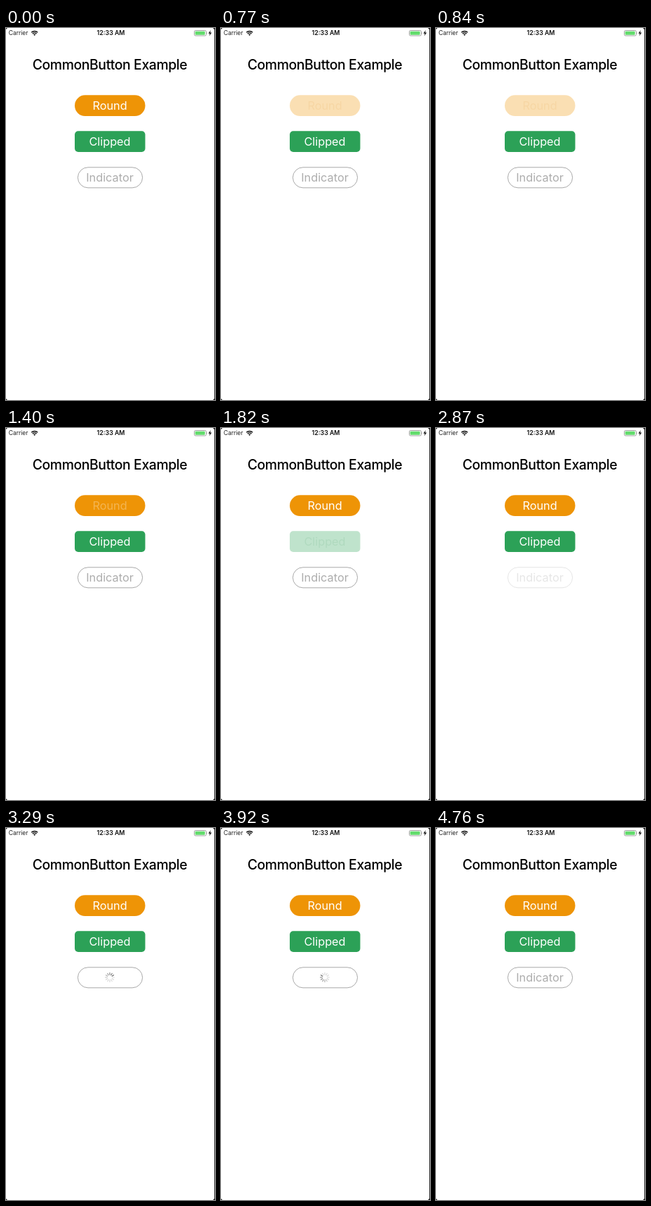
Recreate the animation shown at these times as an HTML page. Size 298 by 528 pixels, loop 5.04 s.

```html
<!DOCTYPE html>
<html lang="en">
<head>
<meta charset="utf-8">
<title>Button states</title>
<style>
  html, body { margin: 0; width: 100%; height: 100%; overflow: hidden; background: #fff; }
  svg { display: block; width: 298px; height: 528px; }
  text { font-family: Inter, sans-serif; font-optical-sizing: none; text-anchor: middle; }
  .label { font-size: 16.3px; }
</style>
</head>
<body>
<svg viewBox="0 0 298 528">
  <text x="17.6" y="10.4" font-size="8.5" fill="#222">Carrier</text>
  <g fill="none" stroke="#111" stroke-width="1.5">
    <path d="M36.2 6.3a6.4 6.4 0 0 1 9 0M37.9 8.1a4 4 0 0 1 5.6 0"/>
    <path d="M40.7 10.9l-1.5-1.6a2.2 2.2 0 0 1 3 0z" fill="#111" stroke="none"/>
  </g>
  <text x="149.5" y="10.4" font-size="8.8" font-weight="600" fill="#111">12:33 AM</text>
  <rect x="268.5" y="3.5" width="17" height="7.5" rx="1.8" fill="none" stroke="#8b8b8b" stroke-width=".8"/>
  <rect x="269.7" y="4.7" width="14" height="5.1" rx=".8" fill="#62dc6c"/>
  <path d="M286.4 5.8q1.2 1.4 0 2.8z" fill="#8b8b8b"/>
  <path d="M291.8 3l-3.2 4.7h2.1l-.8 3.6 3.4-4.9h-2.2z" fill="#111"/>

  <text x="148" y="59.2" font-size="19.4" font-weight="500" letter-spacing="-.4">CommonButton Example</text>

  <rect id="round" x="98" y="95.3" width="100.5" height="29.7" rx="14.8" fill="#ee9406"/>
  <text id="roundText" class="label" x="148" y="116.4">Round</text>
  <rect id="clipped" x="98" y="146.3" width="100.5" height="29.7" rx="5" fill="#2ca157"/>
  <text id="clippedText" class="label" x="148" y="167.4">Clipped</text>
  <rect id="outline" x="102.4" y="197.8" width="92.2" height="29" rx="14.5" fill="none" stroke="#a9a9a9"/>
  <text id="outlineText" class="label" x="148" y="218.3" fill="#adadad">Indicator</text>
  <g id="spinner" stroke="#666" stroke-width="1.2" stroke-linecap="round"></g>

  <path d="M297.5 0V528" stroke="#333"/>
  <path d="M0 0h2l-2 2zM0 528h2l-2-2zM298 0h-3l3 3zM298 528h-3l3-3z" fill="#222"/>
</svg>
<script>
const LOOP = 5040, DIM = 0.3, SPOKES = 12, SPIN_START = 3080, SPIN_END = 4620;
const el = id => document.getElementById(id);
const set = (node, attrs) => { for (const k in attrs) node.setAttribute(k, attrs[k]); };
const ramp = (t, from, length) => Math.min(1, Math.max(0, (t - from) / length));

const spokes = Array.from({ length: SPOKES }, (_, i) => {
  const line = document.createElementNS('http://www.w3.org/2000/svg', 'path');
  set(line, { d: 'M148 208.3V205.6', transform: `rotate(${i * 360 / SPOKES} 148 212)` });
  return el('spinner').appendChild(line);
});

// The fill switches at once; the title fades back after release.
function drawFilled(id, t, down, up, tint) {
  const pressed = t >= down && t < up;
  const fade = t < down ? 1 : DIM + (1 - DIM) * ramp(t, up, 300);
  set(el(id), { opacity: pressed ? DIM : 1 });
  set(el(id + 'Text'), { fill: pressed ? tint : '#fff', opacity: pressed ? 0.1 : fade });
}

function drawOutline(t) {
  const pressed = t >= 2730 && t < SPIN_START;
  const loading = t >= SPIN_START && t < SPIN_END;
  set(el('outline'), { opacity: pressed ? DIM : 1 });
  let title = 1;
  if (pressed) title = DIM;
  else if (loading) title = DIM * (1 - ramp(t, SPIN_START, 200));
  else if (t >= SPIN_END) title = DIM + (1 - DIM) * ramp(t, SPIN_END, 140);
  set(el('outlineText'), { opacity: title });

  set(el('spinner'), { visibility: loading ? 'visible' : 'hidden' });
  const head = Math.floor((t - SPIN_START) * SPOKES / 1000);
  spokes.forEach((spoke, i) => {
    const age = (((head - i) % SPOKES) + SPOKES) % SPOKES;
    set(spoke, { opacity: Math.max(0.25, 1 - age * 0.12) });
  });
}

function draw() {
  const t = performance.now() % LOOP;
  drawFilled('round', t, 770, 1400, '#d98a20');
  drawFilled('clipped', t, 1750, 2310, '#2c8a50');
  drawOutline(t);
  requestAnimationFrame(draw);
}
draw();
</script>
</body>
</html>
```
